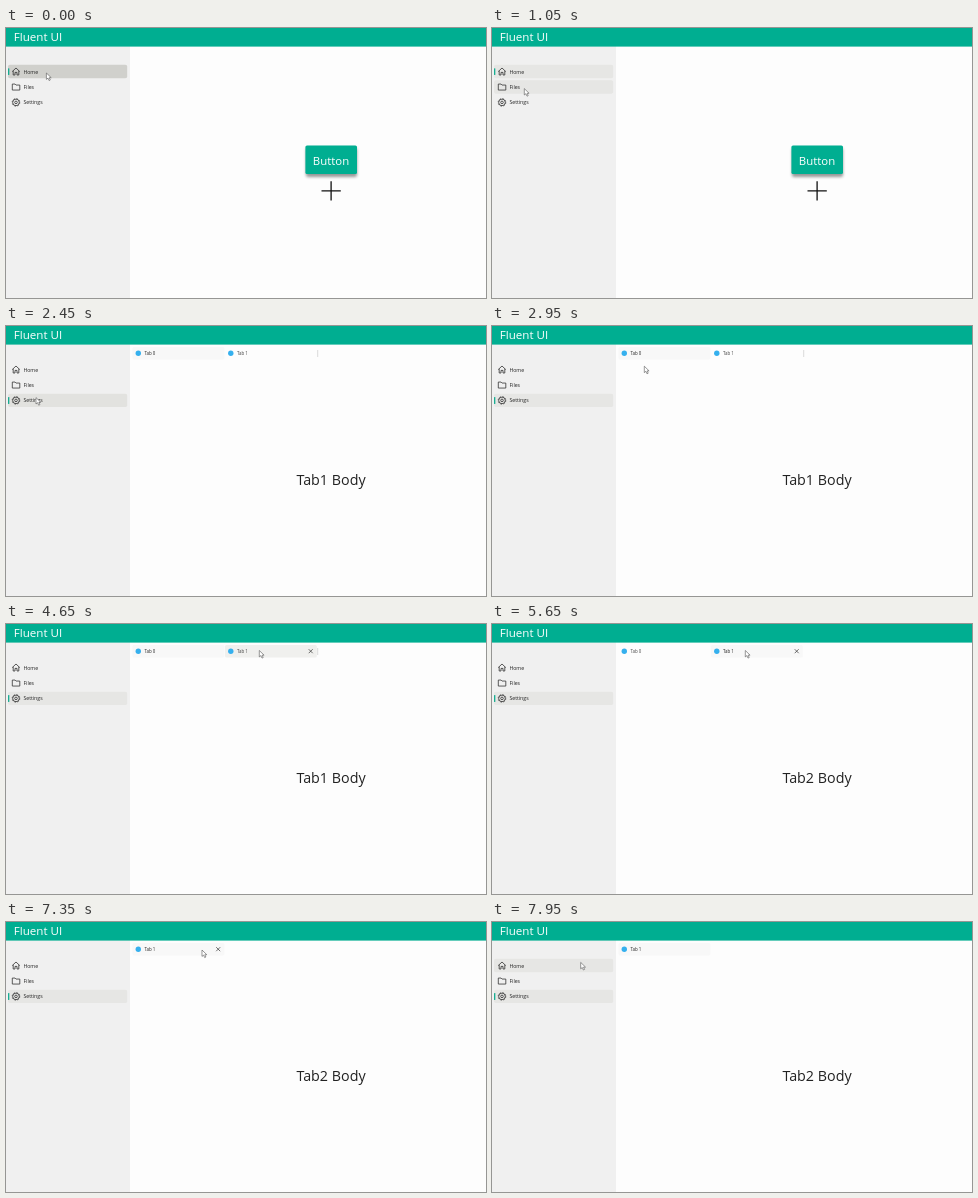
Animation of 480 by 270 pixels, one loop 8 s. Source, as an HTML page:

```html
<!DOCTYPE html>
<html lang="en">
<head>
<meta charset="utf-8">
<title>Navigation and tabs</title>
<style>
  html, body { margin: 0; width: 100%; height: 100%; overflow: hidden; background: #fdfdfd; }
  svg { display: block; width: 100vw; height: 100vh; }
  text { font-family: "Open Sans", "Noto Sans", sans-serif; }
  .line { fill: none; stroke: #333; stroke-width: .8; stroke-linejoin: round; }
</style>
</head>
<body>
<svg viewBox="0 0 480 270">
  <defs>
    <filter id="blur" x="-20%" y="-30%" width="140%" height="160%"><feGaussianBlur stdDeviation="1.7"/></filter>
  </defs>
  <rect width="480" height="270" fill="#fdfdfd"/>
  <rect y="18" width="124" height="252" fill="#f0f0f0"/>
  <rect width="480" height="18.6" fill="#00ae91"/>
  <text x="7.8" y="12.8" font-size="11.6" fill="#fff">Fluent UI</text>

  <g id="nav"></g>

  <g id="home">
    <rect x="300" y="120" width="51" height="29" rx="2" fill="#000" opacity=".4" filter="url(#blur)"/>
    <rect x="299.4" y="117.4" width="51.6" height="28.6" rx="1.6" fill="#00ae91"/>
    <text x="325" y="136.5" font-size="11.4" fill="#fff" text-anchor="middle">Button</text>
    <path d="M315.5 162.8H334.8M325.1 153.2V172.5" stroke="#111" stroke-width="1.3"/>
  </g>

  <g id="page">
    <g id="tabs"></g>
    <path id="divider" d="M311.7 24V31" stroke="#ccc" stroke-width=".7"/>
    <text id="body" x="325" y="158.6" font-size="14.3" fill="#222" text-anchor="middle"></text>
  </g>

  <path id="cursor" d="M0 0V6.4L1.6 5.1L2.7 7.6L3.9 7L2.8 4.7H4.8Z" fill="#fff" stroke="#555" stroke-width=".6" stroke-linejoin="round"/>
</svg>
<script>
const LOOP = 8000;
const $ = id => document.getElementById(id);
const clamp = v => Math.max(0, Math.min(1, v));
const ease = v => { v = clamp(v); return v * v * (3 - 2 * v); };
const within = (t, [a, b]) => t >= a && t < b;

const ITEMS = [
  { label: "Home", press: [0, 50],
    icon: '<path class="line" d="M6.2 43.6L10 40L13.8 43.6M7.2 42.8V47H9V44.4H11V47H12.8V42.8"/>' },
  { label: "Files", press: [1250, 1450],
    icon: '<path class="line" d="M6.3 40.6H9L10 41.6H13.8V46.6H6.3Z"/>' },
  { label: "Settings", press: [1900, 2100],
    icon: '<circle class="line" cx="10" cy="43.5" r="3.3"/><circle cx="10" cy="43.5" r="3.8" fill="none" stroke="#333" stroke-width=".7" stroke-dasharray="1.49"/><circle class="line" cx="10" cy="43.5" r="1.3"/>' }
];
const PITCH = 15.45, TAB_W = 92.5;
const TAB_PRESS = [[6350, 6500], [5000, 5150]];

// time, x, y of the pointer tip
const PATH = [
  [650, 40.4, 45], [1050, 32.3, 60.6], [1450, 32.3, 60.6], [1850, 30, 71.6],
  [2600, 30, 71.6], [2950, 152.3, 40.2], [3100, 150, 30], [3300, 144.5, 42],
  [4150, 144.5, 42], [4650, 253.3, 26.5], [5650, 253.3, 26.5], [6100, 196, 28],
  [7350, 196, 28], [7950, 88.7, 40.4]
];

$("nav").innerHTML = ITEMS.map((item, i) => `<g transform="translate(0 ${i * PITCH})">
  <rect x="2" y="36.8" width="119.2" height="13.4" rx="1.8"/>
  <rect x="2.1" y="40.2" width="1.2" height="6.8" rx=".5" fill="#00a889"/>
  ${item.icon}<text x="17.4" y="45.5" font-size="5.2" fill="#222">${item.label}</text></g>`).join("");

$("tabs").innerHTML = [0, 1].map(i => `<g>
  <rect x="126.5" y="21" width="91.8" height="12.5" rx="1.5"/>
  <circle cx="132.3" cy="27.2" r="2.7" fill="#35b0ee"/>
  <text x="138.4" y="28.8" font-size="4.4">Tab ${i}</text>
  <path d="M210.2 25.2L214.2 29.2M214.2 25.2L210.2 29.2" stroke="#333" stroke-width=".7"/></g>`).join("");

const navs = [...$("nav").children], tabs = [...$("tabs").children];

function pointer(t) {
  if (t <= PATH[0][0]) return PATH[0].slice(1);
  const n = PATH.findIndex(p => p[0] > t);
  if (n < 0) return PATH[PATH.length - 1].slice(1);
  const [a, b] = [PATH[n - 1], PATH[n]];
  const k = ease((t - a[0]) / (b[0] - a[0]));
  return [a[1] + (b[1] - a[1]) * k, a[2] + (b[2] - a[2]) * k];
}

function drawNav(t, x, y) {
  const chosen = t < 1450 ? 0 : t < 2100 ? 1 : 2;
  navs.forEach((g, i) => {
    const top = 36.8 + i * PITCH;
    const hover = x < 121 && y >= top && y < top + 13.4;
    const active = i === chosen;
    const [bar, mark] = g.children;
    bar.setAttribute("fill",
      within(t, ITEMS[i].press) ? (i ? "#dbdbd8" : "#d0d0cc") :
      active && hover ? "#e2e2df" :
      active || hover ? "#e6e6e4" : "none");
    mark.setAttribute("opacity", +active);
  });
}

function drawTabs(t, x, y) {
  const closed = t >= 6900;
  const chosen = closed ? 1 : t < 5150 ? 0 : t < 6500 ? 1 : 0;
  tabs.forEach((g, i) => {
    const shift = closed ? 0 : i * TAB_W;
    const left = 126.5 + shift;
    const hover = x >= left && x < left + 91.8 && y >= 21 && y < 33.5;
    const pressed = within(t, TAB_PRESS[i]);
    const active = i === chosen;
    const [bar, , label, cross] = g.children;
    g.setAttribute("transform", `translate(${shift} 0)`);
    g.setAttribute("display", closed && i === 0 ? "none" : "inline");
    bar.setAttribute("fill", pressed ? "#d9d9d7" : active ? "#f8f8f8" : hover ? "#f0f0ee" : "none");
    label.setAttribute("fill", pressed ? "#777" : active ? "#222" : "#444");
    cross.setAttribute("opacity", +hover);
  });
  $("divider").setAttribute("opacity", +(chosen === 0));
  $("body").textContent = `Tab${chosen + 1} Body`;
}

function drawPage(t) {
  const k = ease((t - (t < 2100 ? 1790 : 2100)) / 320);
  const s = 0.83 + 0.17 * k;
  $("page").setAttribute("opacity", k);
  $("page").setAttribute("transform", `translate(325 145) scale(${s}) translate(-325 -145)`);
  $("home").setAttribute("opacity", 1 - clamp((t - 1450) / 300));
}

function draw(t) {
  const [x, y] = pointer(t);
  drawNav(t, x, y);
  drawTabs(t, x, y);
  drawPage(t);
  $("cursor").setAttribute("transform", `translate(${x} ${y})`);
}

const start = performance.now();
function tick() {
  draw((performance.now() - start) % LOOP);
  requestAnimationFrame(tick);
}
draw(0);
requestAnimationFrame(tick);
</script>
</body>
</html>
```
